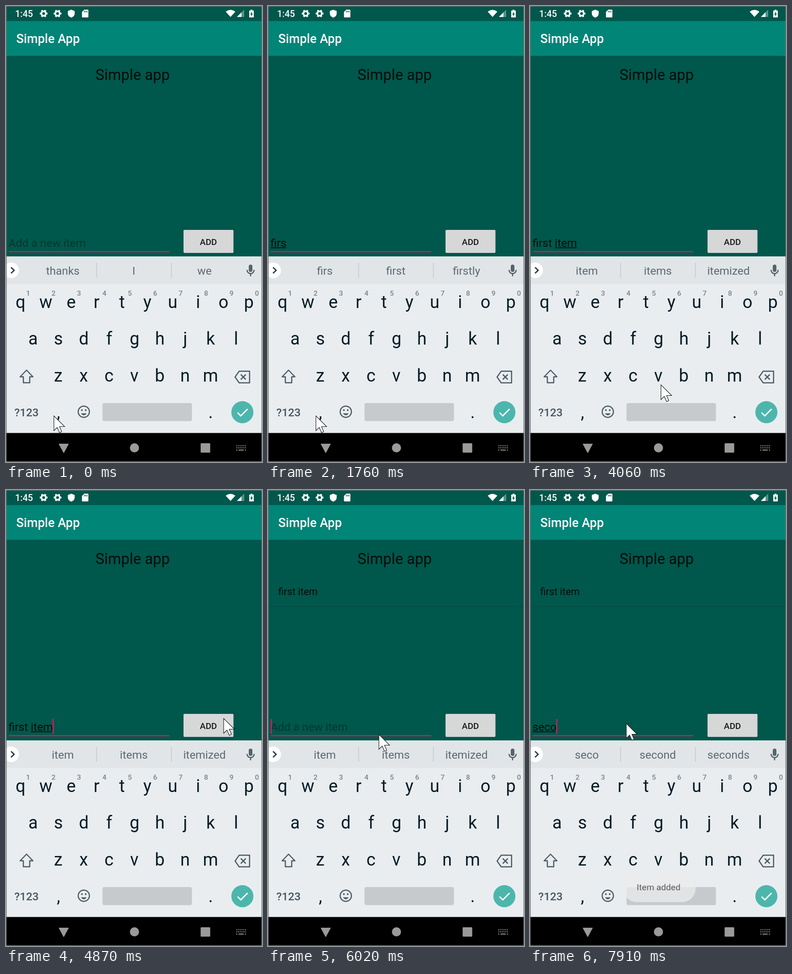
Animation of 561 by 998 pixels, one loop 8000 ms. Source, as an HTML page:

```html
<!DOCTYPE html>
<html lang="en">
<head>
<meta charset="utf-8">
<title>Simple App</title>
<style>
html, body { margin: 0; width: 100%; height: 100%; overflow: hidden; background: #000; }
svg { display: block; width: 100%; height: 100%; }
text { font-family: Roboto, sans-serif; white-space: pre; }
.mid { text-anchor: middle; }
.medium { font-weight: 500; }
.key { font-size: 38px; fill: #071c26; }
.num { font-size: 15.5px; fill: #78838a; }
.word { font-size: 24.5px; fill: #5c6a72; }
.field { font-size: 24.6px; }
.icon { fill: none; stroke: #4a5a62; stroke-width: 2.5; }
</style>
</head>
<body>
<svg viewBox="0 0 561 998">
  <defs>
    <clipPath id="btnClip"><rect x="389" y="490" width="109.5" height="50" rx="2"/></clipPath>
    <clipPath id="left"><rect x="1.5" y="550" width="40" height="56"/></clipPath>
    <g id="gear" fill="none" stroke="#fff">
      <circle r="4.9" stroke-width="3.6"/>
      <circle r="7.1" stroke-width="2.8" pathLength="12" stroke-dasharray="1 1" stroke-dashoffset=".5"/>
    </g>
  </defs>

  <rect width="561" height="998" fill="#00574b"/>
  <rect y="33" width="561" height="76" fill="#008577"/>

  <!-- status bar -->
  <g fill="#fff">
    <text class="medium" x="20" y="24" font-size="19.8">1:45</text>
    <use href="#gear" x="82.5" y="16.5"/>
    <use href="#gear" x="113" y="16.5"/>
    <path d="M143 8L150.5 11V16.5C150.5 21 147 24 143 25.5C139 24 135.5 21 135.5 16.5V11Z"/>
    <path d="M171.500 8H179Q180.500 8 180.500 9.500V23.500Q180.500 25 179 25H168Q166.500 25 166.500 23.500V13Z"/>
    <path d="M171.500 10.500V14M174.500 10.500V14M177.500 10.500V14" stroke="#00574b" stroke-width="1.5"/>
    <path d="M481.500 12.500Q492 4.500 502.500 12.500L492 24Z"/>
    <path d="M522 8V24H506Z" opacity=".35"/>
    <path d="M516 14V24H506Z"/>
    <path d="M536 8H540V10H543V25H533V10H536Z"/>
    <path d="M539 12L535 18.500H537.500V23L541 16.500H538.500Z" fill="#00574b"/>
    <text class="medium" x="22.500" y="81" font-size="27.3">Simple App</text>
  </g>

  <text class="mid" x="277.500" y="162" font-size="32.8" fill="#000b09">Simple app</text>
  <g id="item">
    <text x="22.500" y="230" font-size="21.8" fill="#000b09">first item</text>
    <path d="M2 255H560" stroke="#004d42" stroke-width="1.4"/>
  </g>

  <!-- input row -->
  <text id="hint" class="field" x="5.500" y="527" fill="#00372f">Add a new item</text>
  <text id="typed" class="field" x="5.500" y="527" fill="#000b09"></text>
  <path id="under" stroke="#000b09" stroke-width="1.6"/>
  <rect x="6" y="536.300" width="352" height="2.700" fill="#c41c5f"/>
  <rect id="caret" y="501" width="2.700" height="32.500" fill="#d01c60"/>
  <rect x="388.500" y="492" width="110.500" height="50" rx="2" fill="#003b33" opacity=".55"/>
  <rect x="389" y="490" width="109.500" height="50.500" rx="2" fill="#d6d7d7"/>
  <g clip-path="url(#btnClip)"><circle id="ripple" cx="470" cy="497" fill="#000" opacity=".14"/></g>
  <text class="mid medium" x="443.500" y="523" font-size="19.1" fill="#1a1a1a">ADD</text>

  <!-- keyboard -->
  <rect y="548" width="561" height="387" fill="#e9edf0"/>
  <rect y="548" width="561" height="60.500" fill="#e1e5e8"/>
  <path d="M198.500 562V595M362.500 562V595" stroke="#c3c9cd" stroke-width="1.5"/>
  <g clip-path="url(#left)"><circle cx="11.500" cy="578.500" r="17" fill="#fff"/></g>
  <path d="M11 572L17.800 578.500L11 585" fill="none" stroke="#24343c" stroke-width="2.700"/>
  <g id="words"></g>
  <rect x="532" y="566" width="8" height="16" rx="4" fill="#56646b"/>
  <path d="M528.200 577.500C528.200 588.500 543.800 588.500 543.800 577.500M536 585.500V591.500" class="icon" stroke-width="2.300"/>
  <g id="keys"></g>
  <path class="icon" d="M45 797L31 811.500H38V824.500H52V811.500H59Z" stroke-linejoin="round"/>
  <path class="icon" d="M502 812L511 799.300H533.800V824.700H511ZM514.500 806.500L525.500 817.500M525.500 806.500L514.500 817.500" stroke-linejoin="round"/>
  <text class="mid medium" x="45" y="897.500" font-size="24.3" fill="#45555d">?123</text>
  <circle class="icon" cx="170.500" cy="888" r="12.300"/>
  <path d="M164.500 891.500H176.500C174.500 897 166.500 897 164.500 891.500Z" fill="#4a5a62"/>
  <g fill="#4a5a62"><circle cx="166.300" cy="884.500" r="1.900"/><circle cx="174.700" cy="884.500" r="1.900"/></g>
  <rect x="211.500" y="869" width="196" height="39.500" rx="4" fill="#c6cacd"/>
  <circle cx="518" cy="889" r="24.200" fill="#4db6ac"/>
  <path d="M507.500 890L514.500 897L529.500 882" fill="none" stroke="#fff" stroke-width="2.800"/>

  <!-- navigation bar -->
  <rect y="934.500" width="561" height="64" fill="#000"/>
  <g fill="#9a9a9a">
    <path d="M116 958.500H137L126.500 978Z" stroke="#9a9a9a" stroke-linejoin="round"/>
    <circle cx="281.500" cy="967" r="10"/>
    <rect x="426.500" y="957" width="21" height="20.500" rx="1.500"/>
  </g>
  <path d="M504.500 962.500H526M504.500 967H526" stroke="#8c8c8c" stroke-width="2.200" stroke-dasharray="2.300 1.540"/>
  <path d="M504.500 971.800H507M509.500 971.800H521M523.500 971.800H526" stroke="#8c8c8c" stroke-width="2.200"/>

  <g id="toast">
    <rect x="204" y="841" width="159" height="61" rx="30" fill="#ececec"/>
    <text class="mid" x="281.800" y="875.500" font-size="19.1" fill="#333">Item added</text>
  </g>
  <path id="mouse" d="M0 0V32.500L7.300 25.500L12.300 36.800L17 34.500L12.300 23.500H23.500Z" fill="#fff" stroke="#111" stroke-width="1.100"/>
  <path d="M.75 0V998M0 .5H561M560.500 0V998M0 997H561" fill="none" stroke="#6f7675" stroke-width="1.300"/>
</svg>

<script>
const LOOP = 8000;
const $ = id => document.getElementById(id);

function addText(parent, cls, x, y, str) {
  const el = document.createElementNS("http://www.w3.org/2000/svg", "text");
  el.setAttribute("class", cls);
  el.setAttribute("x", x);
  el.setAttribute("y", y);
  el.textContent = str;
  return parent.appendChild(el);
}

function addKeys(str, x, y) {
  [...str].forEach((c, i) => addText($("keys"), "key mid", x + i * 55.6, y, c));
}
addKeys("qwertyuiop", 31.7, 661);
addKeys("asdfghjkl", 59.3, 741);
addKeys("zxcvbnm", 114.500, 822);
addKeys(",", 115, 902);
addKeys(".", 448.500, 902);
[..."1234567890"].forEach((c, i) => addText($("keys"), "num mid medium", 48.500 + i * 55.700, 633.500, c));
const words = [124.500, 280, 435].map(x => addText($("words"), "word mid", x, 588, ""));

// Every track is a list of [start time, ...values]; "_" opens the word being composed.
const typing = [
  [0, ""], [120, "_fi"], [260, "_fir"], [1210, "_firs"], [1880, "_first"], [2000, "first "],
  [2960, "first _i"], [3360, "first _it"], [3480, "first _ite"], [3630, "first _item"],
  [5630, ""], [7110, "_s"], [7480, "_se"], [7790, "_sec"], [7910, "_seco"]
];
const suggestions = [
  [0, "thanks I we"], [120, "fi first final"], [380, "fir first for"], [630, "fir first fire"],
  [1330, "firs first firstly"], [1880, "first First firsthand"], [2000, "ed time thing"],
  [3110, "i I is"], [3360, "it it's is"], [3630, "item items itemized"],
  [6440, "thanks I we"], [7230, "s so sorry"], [7480, "se see set"],
  [7790, "sec second set"], [7910, "seco second seconds"]
];
const mouse = [
  [0, 105, 897], [4060, 287, 829], [4180, 390, 745], [4300, 470, 676], [4420, 517, 636],
  [4570, 434, 594], [4720, 423, 585], [4870, 477, 500], [4990, 479, 491], [5110, 474, 496],
  [5360, 470, 496], [5900, 370, 522], [6020, 243, 535], [6140, 214, 531], [6440, 211, 511]
];
const toast = [[0, 0], [6140, .2], [6290, .42], [6440, .62], [6590, .82], [6710, 1], [7910, .75]];
const ripple = [[0, 0], [5480, 38], [5630, 100], [5750, 0]];
const blinks = [120, 630, 1210, 1760, 1880, 2560, 2960, 4060, 4570, 5110, 5630, 6290, 6590];

const at = (track, t) => track.findLast(step => step[0] <= t).slice(1);
const show = (id, on) => $(id).setAttribute("visibility", on ? "visible" : "hidden");

function widthOf(str) {
  $("typed").textContent = str;
  return str ? $("typed").getComputedTextLength() : 0;
}

function draw(t) {
  const [raw] = at(typing, t);
  const mark = raw.indexOf("_");
  const from = 5.5 + widthOf(raw.slice(0, Math.max(mark, 0)));
  const end = 5.5 + widthOf(raw.replace("_", ""));
  $("under").setAttribute("d", `M${from} 529.3H${end}`);
  show("under", mark >= 0);
  show("hint", !raw);
  $("caret").setAttribute("x", Math.max(6, end - 1));
  show("caret", blinks.filter(b => b <= t).length % 2);

  at(suggestions, t)[0].split(" ").forEach((w, i) => words[i].textContent = w);
  $("mouse").setAttribute("transform", `translate(${at(mouse, t)})`);
  $("toast").setAttribute("opacity", at(toast, t)[0]);
  $("ripple").setAttribute("r", at(ripple, t)[0]);
  show("item", t >= 5630);
}

const start = performance.now();
function tick() {
  draw((performance.now() - start) % LOOP);
  requestAnimationFrame(tick);
}
tick();
</script>
</body>
</html>
```
